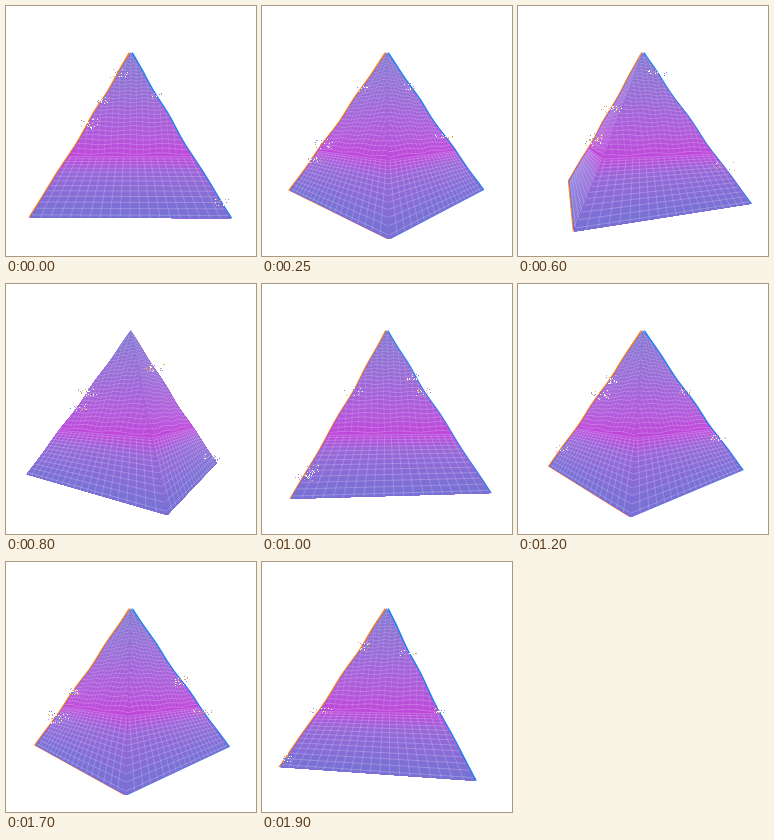
An HTML page with a canvas for the animation above (1.95 s loop, 250 px wide and 250 px high).

```html
<!DOCTYPE html>
<html lang="en">
<head>
<meta charset="utf-8">
<title>Turning pyramid</title>
<style>
  html, body { margin: 0; width: 100%; height: 100%; overflow: hidden; background: #fff; }
  canvas { display: block; width: 250px; height: 250px; }
</style>
</head>
<body>
<canvas id="stage"></canvas>
<script>
const SIZE = 250, LOOP = 1950, STEP = 50, STEPS = LOOP / STEP;
const CENTER_X = 124.8, HORIZON = 125, RADIUS = 96.2, TOP = -79, HEIGHT = 138, NEARNESS = 0.454;
const BAND = 0.71;   // height of the magenta glow, 0 apex to 1 base
const SPECKS = ['#ffffff', '#f7b04a', '#8f7be0', '#ffffff', '#4f9cf5', '#ffffff', '#c9a27c', '#d98ae8', '#ffffff'];
const SHADES = [
  [0, 128, 122, 208], [0.35, 152, 108, 214], [0.6, 178, 88, 218],
  [BAND, 192, 70, 218], [0.79, 152, 104, 214], [1, 116, 114, 212]
];

const canvas = document.getElementById('stage');
const ctx = canvas.getContext('2d');
const ratio = window.devicePixelRatio || 1;
canvas.width = canvas.height = SIZE * ratio;

function seeded(seed) {
  let s = (seed * 7919 + 4241) | 0;
  return () => {
    s = (s + 0x6D2B79F5) | 0;
    let n = Math.imul(s ^ (s >>> 15), 1 | s);
    n ^= n + Math.imul(n ^ (n >>> 7), 61 | n);
    return ((n ^ (n >>> 14)) >>> 0) / 4294967296;
  };
}

function shade(v) {
  let i = 1;
  while (i < SHADES.length - 1 && v > SHADES[i][0]) i++;
  const a = SHADES[i - 1], b = SHADES[i], p = (v - a[0]) / (b[0] - a[0]);
  return 'rgb(' + [1, 2, 3].map(c => Math.round(a[c] + (b[c] - a[c]) * p)).join() + ')';
}

// The sides are almost straight, with a slight ripple.
function spread(v, phase) {
  const middle = Math.sin(Math.PI * v);
  return v + middle * (0.008 * Math.sin(17 * v + phase) - 0.015);
}

function project(x, z, v) {
  const scale = 1 / (1 - NEARNESS * z);
  return [CENTER_X + RADIUS * x * scale, HORIZON + (TOP + HEIGHT * v) * scale];
}

// u runs from -1 (left corner) to 1 (right corner) of one side.
function onFace(face, u, v) {
  const r = spread(v, face.phase), p = (u + 1) / 2;
  const mix = f => r * (f(face.angle) * (1 - p) + f(face.angle + Math.PI / 2) * p);
  return project(mix(Math.sin), mix(Math.cos), v);
}

function trace(points) {
  ctx.beginPath();
  points.forEach(([x, y]) => ctx.lineTo(x, y));
}

function range(n, f) {
  return Array.from({ length: n + 1 }, (_, i) => f(i / n));
}

function outline(face, from) {
  const down = v => from + (1 - from) * v;
  return [
    ...range(20, v => onFace(face, -1, down(v))),
    ...range(20, v => onFace(face, 1, down(1 - v)))
  ];
}

function visibleFaces(turn, phase) {
  return [0, 1, 2, 3].map(i => ({ angle: turn + i * Math.PI / 2, phase })).filter(face => {
    const [ax, ay] = onFace(face, -1, 1), [bx, by] = onFace(face, 1, 1);
    const [px, py] = project(0, 0, 0);
    return (bx - ax) * (py - ay) - (by - ay) * (px - ax) < 0;
  }).sort((a, b) => onFace(a, 0, 1)[0] - onFace(b, 0, 1)[0]);
}

function fringe(faces, dx, color) {
  ctx.save();
  ctx.translate(dx, 0);
  ctx.fillStyle = color;
  faces.forEach(face => { trace(outline(face, 0)); ctx.fill(); });
  ctx.restore();
}

function drawFace(face) {
  for (let i = 0; i < 50; i++) {
    trace(outline(face, i / 50));
    ctx.fillStyle = shade(i / 50);
    ctx.fill();
  }
  ctx.save();
  trace(outline(face, 0));
  ctx.clip();
  drawRows(face);
  drawColumns(face);
  ctx.restore();
}

function drawRows(face) {
  const rows = [];
  for (let v = 0.05; v < BAND; v += 0.026) rows.push(v);
  for (let i = 1; i <= 14; i++) rows.push(BAND + (1 - BAND) * Math.pow(i / 14.4, 1.4));
  rows.forEach(v => {
    const wave = v < BAND ? 0.004 : 0;
    trace(range(24, p => {
      const u = p * 2 - 1;
      return onFace(face, u, v + wave * Math.sin(8 * u + 19 * v + face.phase));
    }));
    ctx.lineWidth = 0.75;
    ctx.strokeStyle = v < BAND ? 'rgba(226,184,246,.45)' : 'rgba(208,190,244,.5)';
    ctx.stroke();
  });
}

// Columns run straight above the glow and fan out below it.
function drawColumns(face) {
  ctx.lineWidth = 0.75;
  for (let k = -10; k <= 10; k++) {
    const upper = [], lower = [];
    for (let v = 0.02; v <= 1.001; v += 0.02) {
      const flare = 0.75 + 0.25 * Math.max(0, (v - BAND) / (1 - BAND));
      const u = k * 0.1 * flare / spread(v, face.phase);
      if (Math.abs(u) <= 1) (v < BAND ? upper : lower).push(onFace(face, u, v));
    }
    trace(upper);
    ctx.strokeStyle = 'rgba(224,192,248,.25)';
    ctx.stroke();
    trace(lower);
    ctx.strokeStyle = 'rgba(214,200,248,.4)';
    ctx.stroke();
  }
}

// Small bursts of loose pixels along both outer edges.
function drawSpecks(faces, step) {
  const rnd = seeded(step);
  const sides = [[faces[0], -1], [faces[faces.length - 1], 1]];
  for (let c = 0; c < 5; c++) {
    const [face, u] = sides[c % 2];
    const [x, y] = onFace(face, u, 0.15 + 0.83 * rnd());
    const wide = 10 + 13 * rnd(), high = 5 + 5 * rnd(), count = 14 + 24 * rnd();
    for (let i = 0; i < count; i++) {
      ctx.fillStyle = SPECKS[Math.floor(rnd() * SPECKS.length)];
      ctx.fillRect(Math.round(x + (rnd() - 0.5) * wide), Math.round(y + (rnd() - 0.5) * high), 1, 1);
    }
  }
}

function draw(step) {
  const time = step * STEP, cycle = 2 * Math.PI * step / STEPS;
  const faces = visibleFaces(44.5 * Math.PI / 180 + cycle, cycle * 3);
  const shift = 1.9 * Math.min(1, Math.abs(time - 800) / 250);

  ctx.setTransform(ratio, 0, 0, ratio, 0, 0);
  ctx.fillStyle = '#fff';
  ctx.fillRect(0, 0, SIZE, SIZE);
  if (shift) {
    fringe(faces, -shift, '#f5801c');
    fringe(faces, shift, '#1486fb');
  }
  faces.forEach(drawFace);
  drawSpecks(faces, step);
}

let shown = -1;
const start = performance.now();
function tick() {
  const step = Math.floor((performance.now() - start) % LOOP / STEP);
  if (step !== shown) draw(shown = step);
  requestAnimationFrame(tick);
}
tick();
</script>
</body>
</html>
```
